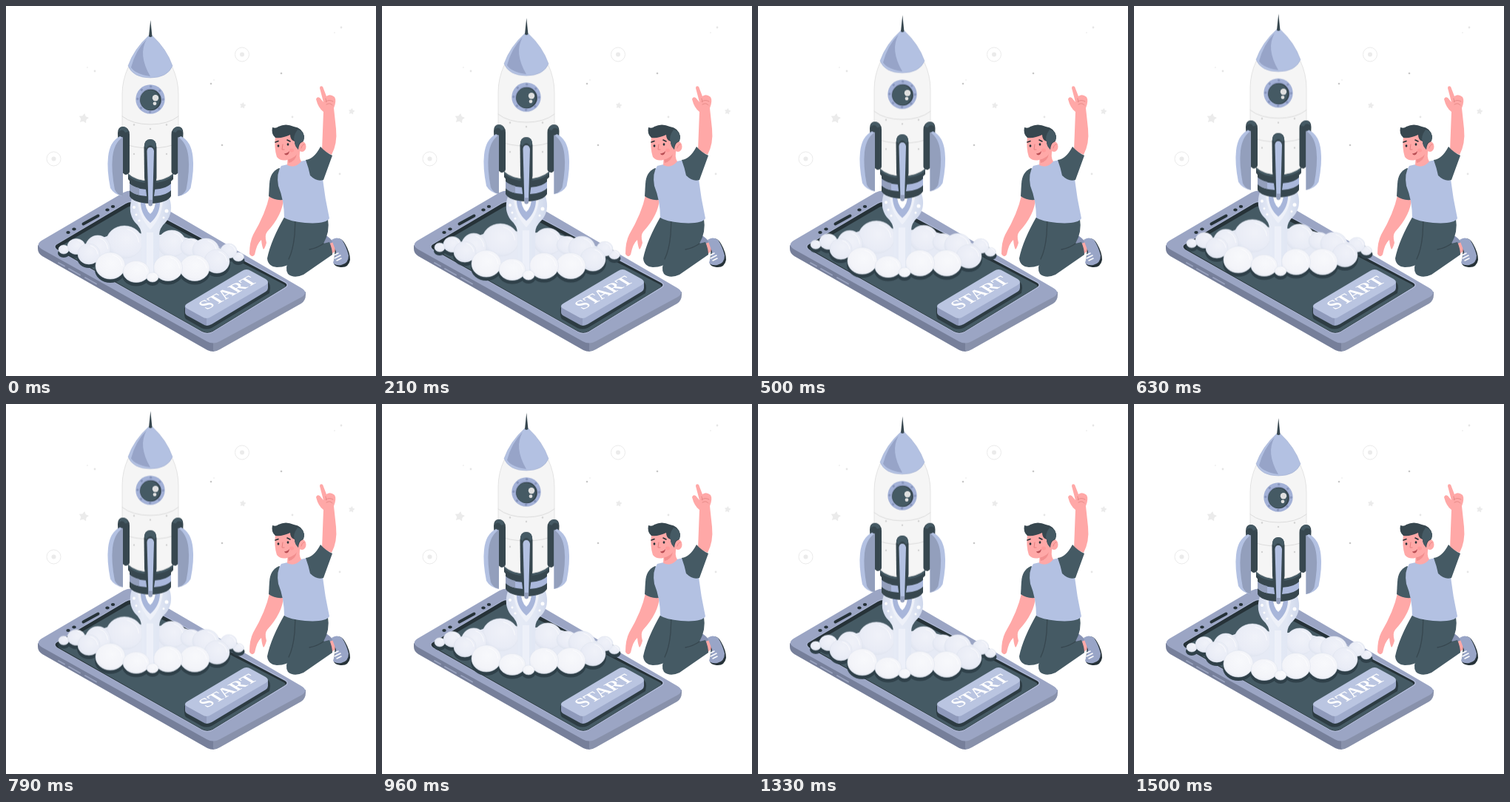
These frames come from a looping animation (500x500 px, 1.54 s). An HTML page:

```html
<!DOCTYPE html>
<html lang="en">
<head>
<meta charset="utf-8">
<title>Rocket launch</title>
<style>
  html, body { margin: 0; width: 100%; height: 100%; overflow: hidden; background: #fff; }
  svg { display: block; width: 100vw; height: 100vh; }
  .slate { fill: #455a64; }
  .dark { fill: #37474f; }
  .ink { fill: #263238; }
  .blue { fill: #b3c1e2; }
  .shade { fill: #939fbc; }
  .skin { fill: #ffa8a7; }
  .line { fill: none; stroke-linecap: round; stroke-linejoin: round; }
  .start { font: bold 25px "Liberation Serif", "Times New Roman", serif; fill: #fff; text-anchor: middle; }
</style>
</head>
<body>
<svg viewBox="0 0 500 500" xmlns="http://www.w3.org/2000/svg">
  <defs>
    <radialGradient id="puffBack" cx=".58" cy=".4" r=".62">
      <stop offset="0" stop-color="#f0f2f9"/><stop offset=".8" stop-color="#e9ecf6"/><stop offset="1" stop-color="#e0e5f1"/>
    </radialGradient>
    <radialGradient id="puffFront" cx=".55" cy=".4" r=".62">
      <stop offset="0" stop-color="#f8f9fc"/><stop offset=".8" stop-color="#f3f4f9"/><stop offset="1" stop-color="#e9ecf4"/>
    </radialGradient>
    <linearGradient id="jet">
      <stop offset="0" stop-color="#d3dbee"/><stop offset=".3" stop-color="#e6ebf6"/>
      <stop offset=".7" stop-color="#e1e7f4"/><stop offset="1" stop-color="#cfd8ec"/>
    </linearGradient>
  </defs>

  <g id="sky"></g>

  <!-- phone -->
  <path fill="#767f9a" d="M43 323V328Q43 334 49 338L272 465Q276 467 281 467V450Z"/>
  <path fill="#8891ab" d="M280 450V467Q284 467 289 464L399 402Q405 398 405 390V386Z"/>
  <path fill="#9ba5c4" d="M48 317L159 252Q168 247 178 252L399 381Q409 387 400 393L289 453Q280 458 271 453L49 329Q39 323 48 317Z"/>
  <path fill="#b3bddb" d="M68 322L162 266Q169 262 176 266L378 373Q384 377 378 381L279 441Q272 445 265 441L68 329Q63 325 68 322Z"/>
  <path class="ink" d="M69 322L162 267Q169 263 176 267L377 374Q382 377 377 380L279 440Q272 443.500 265 440L69 329Q64 325 69 322Z"/>
  <path class="slate" d="M73 325L164 272Q169 269 174 272L375 376Q380 378.500 375 381L279 439.500Q272 443 265 439.500L73 330Q69 327.500 73 325Z"/>
  <g class="ink">
    <ellipse cx="84" cy="306" rx="2.700" ry="2"/><ellipse cx="92" cy="301.500" rx="2.700" ry="2"/>
    <ellipse cx="137" cy="275.500" rx="2.700" ry="2"/><ellipse cx="144.500" cy="271" rx="2.700" ry="2"/>
  </g>
  <path class="line" stroke="#263238" stroke-width="4" d="M104.500 294.500L124.500 283.500"/>
  <path class="line" stroke="#98a1bd" stroke-width="2" d="M71 347L79 351.500M85 355L100 363.500M107 367L122 375.500"/>

  <!-- button -->
  <path class="ink" opacity=".75" d="M241 408L322 359Q327 356 332 359L353 372Q357 375 357 381L356 388L278 435Q271 438 264 435L243 423Q240 419 241 408Z"/>
  <path fill="#8f9abb" d="M242 405V414Q242 417 246 419L266 430Q269 432 272 432V416Z"/>
  <path fill="#9fabcc" d="M271 418V432Q274 432 278 430L351 386Q354 384 354 381V373Z"/>
  <path fill="#bac5e1" d="M245 402L319 358Q325 354 331 358L351 369Q357 373 351 377L277 420Q271 424 265 420L245 409Q239 405.500 245 402Z"/>
  <text class="start" transform="matrix(.866 -.48 .82 .5 306.500 391.500)">START</text>

  <!-- boy -->
  <g>
    <path class="skin" d="M427 195L429 143Q422 138 419 126Q420 122 424 124L429 130L424 111Q424 107 428 109L433 122Q438 118 444 123Q447 128 443 138L446 166Q448 186 440 201Z"/>
    <path class="line" stroke="#e58785" stroke-width=".9" d="M432 129Q437 126 442 129M433 133Q438 130 441 134M432 125L433 130"/>
    <path class="skin" d="M356 256L375 260Q374 282 353 305Q349 310 352 320Q350 327 348 329Q346 326 345 316Q339 321 336 336Q332 341 329 335Q329 319 334 309Q351 280 356 256Z"/>
    <path class="slate" d="M369 219Q357 224 356 240L355 257Q363 263 374 262L379 226Z"/>

    <path fill="#8994b5" d="M428 307Q439 313 445 323L437 330L424 318Z"/>
    <path class="skin" d="M431 324L442 319L447 330L435 339Z"/>
    <path class="ink" d="M446 315Q453 312 458 321Q465 333 465 343Q463 354 452 353Q444 352 443 348Z"/>
    <path fill="#99a5c7" d="M440 316Q447 311 454 316Q460 325 463 337Q463 348 453 350Q445 351 442 347L446 332Z"/>
    <path class="line" stroke="#fff" stroke-width="1.500" d="M443 337L449 334M444 341L452 337M447 344L453 341"/>

    <path class="slate" d="M378 282L412 290Q398 318 387 344Q381 353 366 353Q354 352 353 341Q358 316 378 282Z"/>
    <path class="slate" d="M391 284L435 288Q438 305 429 321L437 319Q441 328 441 336L402 363Q389 369 381 362Q376 355 383 341Q389 329 390 309Z"/>
    <path class="line" stroke="#37474f" stroke-width="1.300" d="M391 288L390 309Q388 330 382 342M429 321Q421 327 410 329"/>

    <path class="blue" d="M372 216L407 208Q415 222 428 234Q431 260 437 287Q432 295 404 293Q383 291 376 286Q376 263 368 243Q365 226 372 216Z"/>
    <path class="slate" d="M405 208Q416 207 425 190Q432 198 441 202L429 235Q420 238 411 229Q409 219 405 208Z"/>

    <path class="skin" d="M381 199L398 193Q395 204 399 210Q391 220 380 215Z"/>
    <path fill="#f28f8f" d="M381 207Q388 206 393 200Q391 210 382 212Z"/>
    <path class="skin" d="M364 176Q362 192 366 204Q371 210 380 208Q393 205 397 193L395 175Q380 169 364 176Z"/>
    <ellipse class="skin" cx="400" cy="190" rx="5.500" ry="7"/>
    <path class="line" stroke="#ed8888" d="M399 192Q400 187 403 187"/>
    <path class="dark" d="M364 178Q358 173 360 164Q365 166 368 163Q378 158 389 163Q401 165 403 176Q403 183 400 184Q396 185 395 194Q390 189 390 183Q384 181 384 174Q374 179 364 178Z"/>
    <path class="slate" d="M394 167Q401 168 403 176Q403 183 398 184Q394 187 395 194Q390 189 390 183Q387 177 394 167Z"/>
    <ellipse class="ink" cx="368" cy="189" rx="1.400" ry="1.800"/><ellipse class="ink" cx="381" cy="187" rx="1.400" ry="1.800"/>
    <path class="line" stroke="#263238" stroke-width="1.600" d="M364 184L368 182.500M380 181L384 183"/>
    <path class="line" stroke="#e58080" d="M374 187L373 194L376 194"/>
    <path fill="#b94f55" d="M376 199Q380 200 383 196Q382 203 377 201Z"/>
    <ellipse cx="386" cy="195" rx="3" ry="2.500" fill="#ff9292" opacity=".6"/>
  </g>

  <!-- everything that floats -->
  <g id="craft">
    <g id="shadow" fill="#2f4049"></g>
    <path fill="#e6eaf5" d="M90 330L125 315L160 303L195 310L224 308L270 320L304 333L285 352L200 364L140 356Z"/>
    <g id="back"></g>
    <path fill="url(#jet)" d="M170 260Q164 279 174 292Q183 300 183 310V362H207V310Q207 300 216 292Q227 279 221 260Z"/>
    <path fill="#f0f3fa" opacity=".8" d="M190 306H199V362H190Z"/>
    <path fill="#eef1f9" d="M178 264Q180 286 195 302Q210 286 212 264Z"/>
    <path fill="#a8b6da" d="M182 262Q181 281 195 293Q209 281 208 262Z"/>
    <path fill="#fff" d="M188 262Q188 275 195 281Q202 275 202 262Z"/>
    <g fill="#fff">
      <circle cx="173" cy="272" r="2"/><circle cx="217" cy="277" r="2.500"/><circle cx="176" cy="282" r="1.500"/>
      <circle cx="213" cy="286" r="1.500"/><circle cx="180" cy="290" r="1.600"/>
    </g>

    <path class="dark" d="M167 235V257Q172 266 195 267Q218 266 223 257V235Z"/>
    <path fill="#aab8dc" d="M167 240V249Q175 257 195 257Q215 257 223 249V240Q215 248 195 248Q175 248 167 240Z"/>
    <path class="shade" d="M167 240V249Q172 254 180 255.500V246Q172 244 167 240Z"/>
    <path class="dark" d="M165 224V234Q172 244 195 244Q218 244 226 234V224Z"/>
    <path class="slate" d="M165 223V229Q173 239 195 239Q217 239 226 229V223Z"/>
    <path fill="#f5f5f5" stroke="#dedede" stroke-width=".8" d="M165 83Q157 101 157 119V180Q158 207 165 226Q175 236 195 236Q215 236 226 226Q232 207 233 180V119Q233 101 225 83Z"/>
    <path class="line" stroke="#dcdcdc" d="M157 149Q171 160 195 160Q219 160 233 149M158 185Q171 192 195 192Q219 192 232 185"/>
    <g fill="#d2d2d2">
      <circle cx="173" cy="160.500" r="1.200"/><circle cx="195" cy="166" r="1.200"/><circle cx="217" cy="160.500" r="1.200"/>
      <circle cx="173" cy="200" r="1.200"/><circle cx="217" cy="200" r="1.200"/>
    </g>

    <path class="blue" stroke="#a3b0d2" stroke-width=".6" d="M193 40Q195 38 197.500 40Q217 58 225 81Q218 97 195 97Q172 97 165 81Q173 58 193 40Z"/>
    <path fill="#97a4c8" d="M190 45Q175 60 169 83Q175 92 195 95Q178 66 190 45Z"/>
    <path class="dark" d="M193 41L195.300 19L197.500 41Q195 43 193 41Z"/>

    <circle cx="195" cy="126" r="19.700" fill="#a3b1d7"/>
    <circle cx="195" cy="126" r="17.200" class="line" stroke="#8896bd" stroke-width="3" stroke-dasharray=".6 12.900"/>
    <circle cx="195.300" cy="126.500" r="15" fill="#8e9bc0"/>
    <circle cx="195.500" cy="127" r="14.300" class="dark"/>
    <ellipse cx="194.500" cy="127" rx="13" ry="13.500" class="slate"/>
    <circle cx="202" cy="124.300" r="4.200" fill="#e0e0e0"/><circle cx="201" cy="131.800" r="2.400" fill="#e0e0e0"/>

    <g id="fin">
      <path class="dark" d="M151 172Q151 163 158 163Q167 164 167 174V224Q166 228 161 228L153 222Z"/>
      <path class="slate" d="M152 170Q153 163 159 163Q164 164 165 170L161 171Q158 165 152 170Z"/>
      <path class="blue" d="M154 176Q140 183 138 204Q136 221 141 246Q146 255 158 257V178Z"/>
      <path class="shade" d="M158 177Q146 185 144 204Q142 222 147 248Q150 255 158 257Z"/>
    </g>
    <use href="#fin" transform="matrix(-1 0 0 1 390.500 0)"/>
    <path class="dark" d="M186.500 191Q187 180 195 180Q203 180 203.500 191V232L199 264Q195 267 191 264L187 232Z"/>
    <path class="slate" d="M187 190Q187 180 195 180Q203 180 203 190L200 192Q195 184 190 192Z"/>
    <path class="blue" d="M190.500 196Q191 191 195 191Q199 191 200 196L198 268Q195 272 192.500 268Z"/>
    <path class="shade" d="M192.300 262H198.200L198 269Q195 272 192.500 269Z"/>

    <g id="front"></g>
  </g>
</svg>
<script>
  const $ = id => document.getElementById(id);

  function add(parent, tag, attrs) {
    const el = document.createElementNS("http://www.w3.org/2000/svg", tag);
    for (const k in attrs) el.setAttribute(k, attrs[k]);
    $(parent).append(el);
  }

  function star(x, y, r) {
    const pts = Array.from({ length: 10 }, (_, i) => {
      const a = i * Math.PI / 5 - 1.4, d = i % 2 ? r * 0.55 : r;
      return `${x + d * Math.cos(a)},${y + d * Math.sin(a)}`;
    });
    add("sky", "polygon", { points: pts.join(" "), fill: "#ebebeb" });
  }

  function dot(x, y, r, fill = "#e6e6e6") {
    add("sky", "circle", { cx: x, cy: y, r, fill });
  }

  function puff(layer, [cx, cy, rx, ry]) {
    const fill = layer === "back" ? "url(#puffBack)" : "url(#puffFront)";
    add("shadow", "ellipse", { cx, cy: cy + 5, rx: rx + 1, ry });
    add(layer, "ellipse", { cx, cy, rx, ry, fill, stroke: "#dfe4ef", "stroke-width": 0.6 });
    const a = rx * 0.8, b = ry * 0.8;
    add(layer, "path", {
      d: `M${cx + a * 0.2} ${cy - b}Q${cx + a * 0.9} ${cy - b * 0.8} ${cx + a} ${cy}`,
      class: "line", stroke: "#fff", "stroke-width": 1, opacity: 0.7
    });
  }

  star(105, 152, 7);
  star(320, 134.5, 4.5);
  star(467, 142.5, 4.5);
  for (const [x, y] of [[319, 65.5], [64.5, 206.5]]) {
    add("sky", "circle", { cx: x, cy: y, r: 9.5, fill: "none", stroke: "#ebebeb" });
    dot(x, y, 3, "#ebebeb");
  }
  for (const [x, y] of [[277, 105], [372, 91], [292, 188]]) dot(x, y, 1.3, "#c7c7c7");
  for (const [x, y] of [[387, 150], [453, 29], [120, 88], [451, 227]]) dot(x, y, 1.4);
  for (const [x, y] of [[281, 100], [444, 36], [110, 83]]) dot(x, y, 0.8);

  // centre x, centre y, radius x, radius y
  [
    [160, 319, 24.5, 22], [224, 321, 19, 18], [250, 326, 14, 12],
    [78, 329, 7, 6], [95, 325, 12, 10.5], [124, 328, 17, 18], [112, 335, 15, 14],
    [314, 339, 7.5, 6], [301, 331, 11, 10], [270, 330, 18, 16], [285, 345, 17, 16]
  ].forEach(p => puff("back", p));
  [
    [141, 351, 20, 18], [255, 354, 20, 17.5], [219, 354, 19.5, 17.5],
    [176, 359, 18, 14.5], [198, 366.5, 8, 6.5]
  ].forEach(p => puff("front", p));

  const LOOP = 1540;
  $("craft").animate(
    [[0, 0], [750, -10], [1500, 0], [LOOP, 0]].map(([t, y]) => ({
      offset: t / LOOP, transform: `translate(0px, ${y}px)`
    })),
    { duration: LOOP, iterations: Infinity }
  );
</script>
</body>
</html>
```
